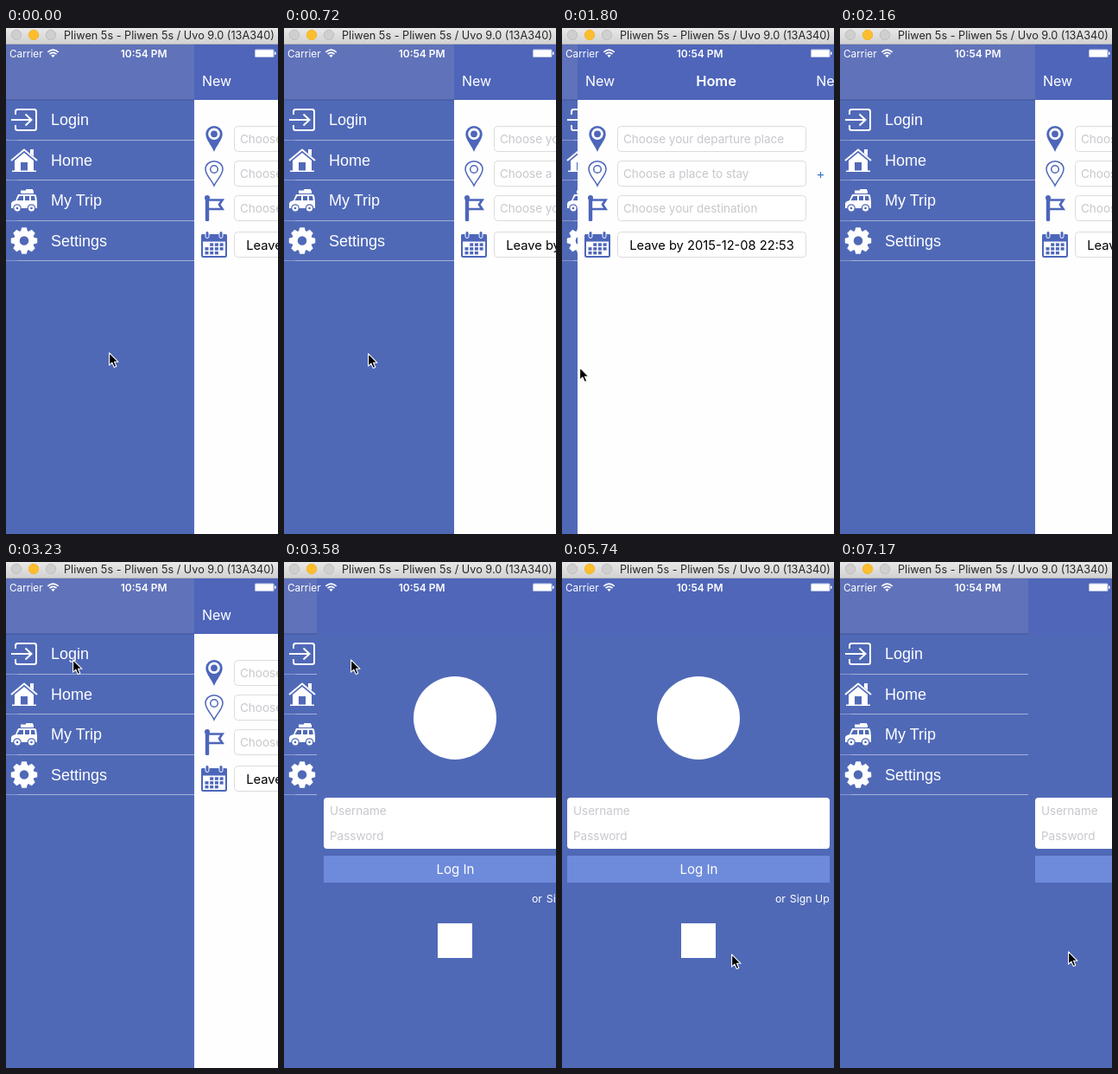
An HTML page for the animation above (8000 ms loop, 315x584 px).

```html
<!DOCTYPE html>
<html lang="en">
<head>
<meta charset="utf-8">
<title>Trip planner menu</title>
<style>
  html, body { margin: 0; width: 100%; height: 100%; overflow: hidden; background: #5069b7; }
  svg { display: block; width: 100vw; height: 100vh; }
  text { font-family: Inter, Roboto, sans-serif; fill: #fff; white-space: pre; }
  .item { font: 18px "Liberation Sans", Arial, sans-serif; }
  .nav { font-size: 16px; }
  .hint { font-size: 13.5px; fill: #c7c7cd; }
  .mid { text-anchor: middle; }
  .field { fill: #fff; stroke: #dcdcdc; }
  .line { fill: none; stroke: #fff; stroke-width: 2; }
  .blue { fill: #4d66ba; }
  .blueline { fill: none; stroke: #4d66ba; }
</style>
</head>
<body>
<svg viewBox="0 0 315 584" preserveAspectRatio="none">
  <defs>
    <linearGradient id="bar" x2="0" y2="1">
      <stop offset="0" stop-color="#e8e8e8"/>
      <stop offset="1" stop-color="#d1d1d1"/>
    </linearGradient>
  </defs>

  <g id="menu">
    <rect width="315" height="584" fill="#5069b7"/>
    <rect y="19" width="315" height="64" fill="#6072b9"/>
    <rect y="82.5" width="315" height="1" fill="#40549a"/>
    <g id="rows"></g>

    <!-- login -->
    <path class="line" d="M11 100V96.500Q11 94 13.500 94H32.500Q35 94 35 96.500V115.500Q35 118 32.500 118H13.500Q11 118 11 115.500V112M6 106H29M22.500 99.500L29.500 106L22.500 112.500"/>

    <!-- house -->
    <path class="line" stroke-width="2.500" d="M6 153L21 140.500L36 153"/>
    <path fill="#fff" d="M28 140H32V148L28 145ZM10 153L21 144L32 153V166H25V155H17V166H10Z"/>
    <rect x="7" y="164.500" width="28" height="1.500" fill="#fff"/>

    <!-- car -->
    <path fill="#fff" d="M17 187.500H23V186H31V187.500H32V191H17ZM14 192H33Q35 192 35.300 195L36 201V208H6V203Q6 201 8 200L11 199Z"/>
    <path fill="#5069b7" d="M15.500 194H20V199H12.500ZM22 194H27V199H22ZM29 194H33L33.800 199H29Z"/>
    <g fill="#fff" stroke="#5069b7" stroke-width="1.200">
      <circle cx="13" cy="208" r="4.200"/><circle cx="29.500" cy="208" r="4.200"/>
    </g>
    <g fill="#5069b7"><circle cx="13" cy="208" r="1.300"/><circle cx="29.500" cy="208" r="1.300"/></g>

    <!-- gear -->
    <g id="gear" fill="#fff"></g>
    <circle cx="21" cy="245.500" r="8.500" fill="none" stroke="#fff" stroke-width="6.500"/>
  </g>

  <g id="home">
    <rect x="-2" width="330" height="584" fill="#fefefe"/>
    <rect x="-2" y="19" width="330" height="64" fill="#4e65ba"/>
    <text class="nav" x="7" y="67">New</text>
    <text class="mid" x="158.500" y="67" font-size="16.400" font-weight="600">Home</text>
    <text class="nav" x="309.500" y="67" text-anchor="end">Next</text>

    <!-- departure pin -->
    <path class="blue" d="M21 143C18.500 136 11.300 129 11.300 122.500A9.700 9.500 0 0 1 30.700 122.500C30.700 129 23.500 136 21 143Z"/>
    <circle cx="21" cy="122.300" r="6.800" fill="#fff"/>
    <circle class="blue" cx="21" cy="122.300" r="3.900"/>

    <!-- stop pin -->
    <path class="blueline" stroke-width="1.500" d="M21 182C18.500 176 11 169.500 11 163A10 9.300 0 0 1 31 163C31 169.500 23.500 176 21 182Z"/>
    <circle class="blueline" cx="21" cy="163" r="4.300" stroke-width="1.500"/>

    <!-- flag -->
    <circle class="blue" cx="13" cy="196" r="3"/>
    <rect class="blue" x="10.800" y="196" width="4.400" height="27" rx="1.500"/>
    <path class="blueline" stroke-width="2.700" d="M14 198.500H30.500L27 203.800L30.500 209H14"/>

    <!-- calendar -->
    <rect class="blueline" x="7" y="239" width="28" height="25" rx="1.500" stroke-width="2"/>
    <rect class="blue" x="6" y="238" width="30" height="8.500" rx="1.500"/>
    <g class="blue" stroke="#fff">
      <rect x="11" y="234.500" width="4" height="8" rx="2"/>
      <rect x="27" y="234.500" width="4" height="8" rx="2"/>
    </g>
    <g id="days" class="blue"></g>

    <g id="fields"></g>
    <text class="mid" x="153.500" y="255.500" font-size="14.700" style="fill:#000">Leave by 2015-12-08 22:53</text>
    <g font-size="15">
      <text class="mid" x="279.500" y="173.500" style="fill:#3673c8">+</text>
      <text class="mid" x="300" y="173.500" style="fill:#3673c8">-</text>
    </g>
  </g>

  <g id="login">
    <rect x="-2" width="330" height="584" fill="#5069b7"/>
    <rect x="-2" y="19" width="330" height="64" fill="#4f66b9"/>
    <circle cx="158" cy="180" r="48" fill="#fff"/>
    <rect x="6" y="272" width="304" height="59" rx="4" fill="#fff"/>
    <text class="hint" x="13" y="291.500">Username</text>
    <text class="hint" x="13" y="320.500">Password</text>
    <rect x="6" y="339" width="304" height="31" fill="#6e8bdb"/>
    <text class="mid" x="158.500" y="360" font-size="15.100">Log In</text>
    <text x="247" y="393" font-size="12.300">or</text>
    <text x="309.700" y="393" font-size="12.300" text-anchor="end">Sign Up</text>
    <rect x="138" y="417" width="40" height="40" fill="#fff"/>
  </g>

  <g id="status">
    <text x="4" y="33.500" font-size="11.800">Carrier</text>
    <g fill="none" stroke="#fff" stroke-width="1.700">
      <path d="M48.300 27.800Q54.500 22.300 60.700 27.800M50.500 30.200Q54.500 26.700 58.500 30.200"/>
    </g>
    <path fill="#fff" d="M52.300 31.700Q54.500 30 56.700 31.700L54.500 34Z"/>
    <text class="mid" x="159.700" y="33.500" font-size="12" font-weight="600">10:54 PM</text>
    <rect x="288" y="24.500" width="22.500" height="9.500" rx="1.500" fill="#fff" opacity=".6"/>
    <rect x="289" y="25.500" width="20.500" height="7.500" rx=".7" fill="#fff"/>
    <rect x="311" y="27.500" width="1.500" height="3.500" rx=".7" fill="#fff"/>
  </g>

  <g id="window">
    <rect width="315" height="19" fill="url(#bar)"/>
    <rect y="18" width="315" height="1" fill="#b9b9b9"/>
    <g fill="#cfcfcf" stroke="#bfbfbf">
      <circle cx="12" cy="8" r="5.700"/>
      <circle cx="32" cy="8" r="5.700" fill="#fdbe2e" stroke="#f3b52c"/>
      <circle cx="52" cy="8" r="5.700"/>
    </g>
    <text x="67" y="13" font-size="12.700" style="fill:#262626">Pliwen 5s - Pliwen 5s / Uvo 9.0 (13A340)</text>
  </g>

  <g id="cursor">
    <path d="M.6 .8V15.200L3.900 12.200L6.300 17.600L8.800 16.500L6.500 11.300H11Z" fill="#000" stroke="#fff" stroke-width="1.100" stroke-linejoin="round"/>
  </g>
</svg>
<script>
const NS = 'http://www.w3.org/2000/svg';
const LOOP = 8000;
const $ = id => document.getElementById(id);

function add(parent, tag, attrs, text) {
  const el = document.createElementNS(NS, tag);
  for (const key in attrs) el.setAttribute(key, attrs[key]);
  if (text) el.textContent = text;
  $(parent).appendChild(el);
}

['Login', 'Home', 'My Trip', 'Settings'].forEach((name, i) => {
  const y = 112 + i * 46.5;
  const lineY = Math.round(129 + i * 46.4);
  add('rows', 'text', { class: 'item', x: 52, y }, name);
  add('rows', 'rect', { y: lineY, width: 13, height: 1, fill: '#8796cb' });
  add('rows', 'rect', { x: 13, y: lineY, width: 302, height: 1, fill: '#a5b0d8' });
});

for (let i = 0; i < 8; i++) {
  add('gear', 'path', {
    d: 'M-4.200 -10L-2.800 -15.200H2.800L4.200 -10Z',
    transform: `translate(21 245.5) rotate(${i * 45})`
  });
}

// the month starts on the second day and ends one short
for (let i = 1; i < 11; i++) {
  add('days', 'rect', {
    x: 10.5 + (i % 4) * 5.7, y: 248.3 + Math.floor(i / 4) * 4.8,
    width: 4, height: 3.5
  });
}

[[113, 'Choose your departure place'], [153, 'Choose a place to stay'],
 [193, 'Choose your destination'], [235, '']].forEach(([y, hint]) => {
  add('fields', 'rect', { class: 'field', x: 44.5, y: y + .5, width: 218, height: 29, rx: 4 });
  if (hint) add('fields', 'text', { class: 'hint', x: 51, y: y + 19.7 }, hint);
});

// time, pointer x, pointer y, page shift, page on top
const steps = [
  [0, 119, 374, 220, 'home'],
  [360, 97, 375, 220, 'home'],
  [720, 97, 375, 199, 'home'],
  [1080, 196, 385, 0, 'home'],
  [1440, 56, 391, 0, 'home'],
  [1800, 20, 391, 20, 'home'],
  [2160, -30, 391, 228, 'home'],
  [2510, 128, 179, 220, 'home'],
  [2870, 74, 120, 220, 'home'],
  [3230, 77, 112, 220, 'home'],
  [3580, 77, 112, 40, 'login'],
  [3940, 131, 136, 0, 'login'],
  [4300, 251, 224, 0, 'login'],
  [5020, 250, 133, 0, 'login'],
  [5380, 242, 152, 0, 'login'],
  [5740, 196, 452, 0, 'login'],
  [6100, 173, 438, 220, 'login'],
  [6460, 179, 437, 220, 'login'],
  [6810, 228, 410, 220, 'login'],
  [7170, 264, 449, 220, 'login']
];

function play(id, pose) {
  const frames = steps.map(s => ({ offset: s[0] / LOOP, easing: 'step-end', ...pose(s) }));
  frames.push({ ...frames[frames.length - 1], offset: 1 });
  $(id).animate(frames, { duration: LOOP, iterations: Infinity });
}

play('cursor', ([, x, y]) => ({ transform: `translate(${x}px, ${y}px)` }));
for (const id of ['home', 'login']) {
  play(id, ([, , , shift, page]) => ({
    transform: `translate(${shift}px, 0px)`,
    opacity: page === id ? 1 : 0
  }));
}
</script>
</body>
</html>
```
